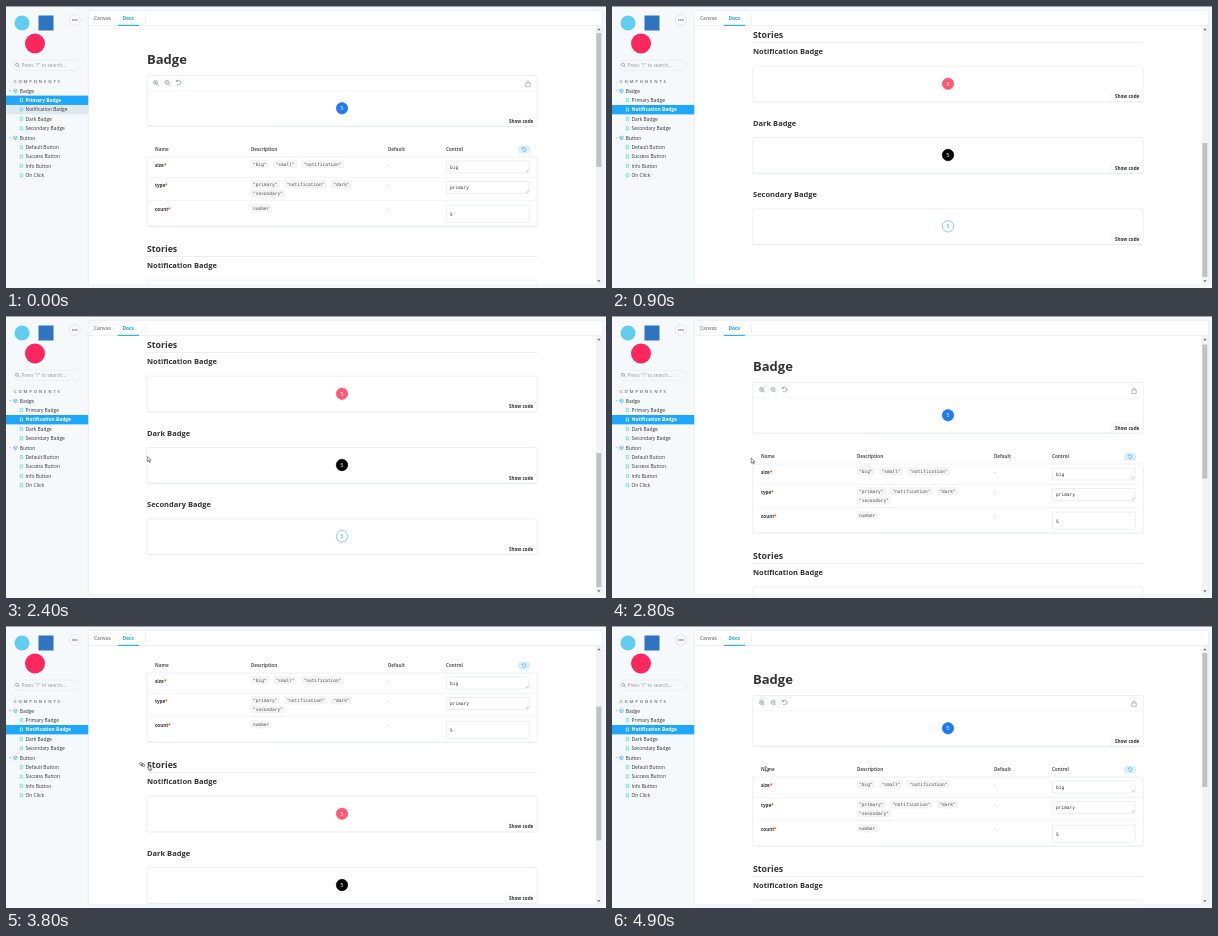
These frames come from a looping animation (600 px wide and 282 px high, 5 s). An HTML page:

```html
<!DOCTYPE html>
<html lang="en">
<head>
<meta charset="utf-8">
<title>Badge docs</title>
<style>
  html, body { margin: 0; width: 100%; height: 100%; overflow: hidden; background: #f6f9fc; }
  svg { display: block; width: 600px; height: 282px; }
  text { font-family: "Open Sans", "Noto Sans", sans-serif; fill: #333; white-space: pre; }
  .b { font-weight: 700; }
  .mono { font-family: "DejaVu Sans Mono", "Noto Sans Mono", monospace; }
  .line { fill: none; stroke: #73828c; stroke-width: .6; }
</style>
</head>
<body>
<svg id="stage" viewBox="0 0 600 282"></svg>
<script>
const stage = document.getElementById('stage');

function add(parent, tag, attrs = {}, label) {
  const el = document.createElementNS('http://www.w3.org/2000/svg', tag);
  for (const k in attrs) el.setAttribute(k, attrs[k]);
  if (label !== undefined) el.textContent = label;
  parent.appendChild(el);
  return el;
}
const group = (p, attrs) => add(p, 'g', attrs);
const rect = (p, x, y, width, height, fill, more) => add(p, 'rect', { x, y, width, height, fill, ...more });
const circle = (p, cx, cy, r, fill, more) => add(p, 'circle', { cx, cy, r, fill, ...more });
const path = (p, d, more) => add(p, 'path', { d, class: 'line', ...more });
const show = (el, on) => el.setAttribute('visibility', on ? 'visible' : 'hidden');
const move = (el, x, y) => el.setAttribute('transform', `translate(${x} ${y})`);

function label(p, x, y, size, str, cls = '', fill = '#333', more = {}) {
  return add(p, 'text', { x, y, 'font-size': size, class: cls, style: `fill:${fill}`, ...more }, str);
}

// Page frame
rect(stage, 0, 0, 600, 282, '#f6f9fc');
rect(stage, 82.3, 4.3, 514.4, 274.6, '#fff', { rx: 1.5, stroke: '#dfe5e9', 'stroke-width': .6 });
rect(stage, 0, 0, 600, .8, '#8d9092');

// Sidebar
const side = group(stage);
circle(side, 16, 17, 7.5, '#61cdf0');
rect(side, 32.5, 9.5, 15, 15, '#2f74c0');
circle(side, 29, 37.5, 10, '#fb275d');
circle(side, 68.8, 14, 5.5, '#f8fafc', { stroke: '#d5dce1', 'stroke-width': .6 });
for (const dx of [-2, 0, 2]) circle(side, 68.8 + dx, 14, .75, '#666');
rect(side, 7.5, 54, 67, 10.3, 'none', { rx: 5.1, stroke: '#e1e7eb', 'stroke-width': .6 });
circle(side, 11, 58.7, 1.5, 'none', { class: 'line' });
path(side, 'M12.1 59.8L13.5 61.2');
label(side, 15.5, 60.8, 4.8, 'Press "/" to search...', '', '#8f989e');
label(side, 8, 76.8, 4.2, 'COMPONENTS', 'b', '#7b868d', { 'letter-spacing': 1.8 });

const rowY = i => 84.9 + i * 9.39;
const rows = ['Badge', 'Primary Badge', 'Notification Badge', 'Dark Badge', 'Secondary Badge',
  'Button', 'Default Button', 'Success Button', 'Info Button', 'On Click'].map((name, i) => {
  const y = rowY(i), isGroup = i % 5 === 0;
  const bg = rect(side, 0, y - 4.7, 82.2, 9.4, 'none');
  if (isGroup) {
    add(side, 'path', { d: `M3.2 ${y - .7}h2.2l-1.1 1.4z`, fill: '#a5aeb4' });
    const icon = group(side, { transform: `translate(9.4 ${y})` });
    path(icon, 'M0 -1.9L1.7 -1V1L0 1.9L-1.7 1V-1ZM-1.7 -1L0 0L1.7 -1M0 0V1.9', { style: 'stroke:#1ea7fd;stroke-width:.5' });
    label(side, 13.8, y + 1.7, 4.85, name);
    return { bg };
  }
  const icon = path(side, `M14.2 ${y - 1.7}h2.4v3.4l-1.2 -1l-1.2 1z`);
  return { bg, icon, text: label(side, 19.5, y + 1.7, 4.88, name) };
});

function styleRow(i, selected, hover) {
  const { bg, icon, text } = rows[i];
  bg.setAttribute('fill', selected ? '#1ea7fd' : hover ? '#e0e9ef' : 'none');
  icon.style.stroke = selected ? '#fff' : '#37d5d3';
  text.style.fill = selected ? '#fff' : '#333';
  text.style.fontWeight = selected ? 700 : 400;
}
rows.forEach((row, i) => row.icon && styleRow(i, false, false));

// Tabs
label(stage, 88, 14.3, 4.75, 'Canvas', 'b', '#8e8e8e');
label(stage, 116.5, 14.3, 4.8, 'Docs', 'b', '#1ea7fd');
rect(stage, 82.6, 19.3, 513.8, .6, '#e3e7ea');
rect(stage, 112, 18.8, 21, 1.1, '#1ea7fd');
rect(stage, 139.5, 8.5, .6, 8, '#dcdfe1');

// Scrolling document
const clip = add(add(stage, 'defs'), 'clipPath', { id: 'view' });
rect(clip, 82.6, 20, 513.8, 258.6, '#000');
const view = group(stage, { 'clip-path': 'url(#view)' });
const doc = group(view);

function card(y, h) {
  rect(doc, 141, y + .8, 390, h, '#edf0f2', { rx: 1.5 });
  rect(doc, 140.8, y, 390.4, h, '#fff', { rx: 1.5, stroke: '#e2e4e6', 'stroke-width': .6 });
}

function preview(y, h, badgeY, fill, ink = '#fff', stroke = fill) {
  card(y, h);
  circle(doc, 336, badgeY, 5.7, fill, { stroke, 'stroke-width': .7 });
  label(doc, 336, badgeY + 2, 5.7, '5', '', ink, { 'text-anchor': 'middle' });
  path(doc, `M499 ${y + h}V${y + h - 9}H531`, { style: 'stroke:#eceeef;stroke-width:.5' });
  label(doc, 503, y + h - 3.4, 4.6, 'Show code', 'b');
}

label(doc, 141, 57.6, 13, 'Badge', 'b');
preview(69.5, 50.5, 102.3, '#2079ee');
rect(doc, 141, 84.7, 390, .5, '#e8eaeb');
for (const x of [149.6, 161]) {
  circle(doc, x, 76.4, 2, 'none', { class: 'line' });
  path(doc, `M${x + 1.4} 77.9l1.6 1.6M${x - 1} 76.4h2`);
}
path(doc, 'M149.6 75.4v2M170.6 75.2A2.3 2.3 0 1 1 171 78.2M170.4 73.9v1.7h1.7');
path(doc, 'M519.7 77h4.6v3.4h-4.6zM520.7 77v-.9a1.3 1.3 0 0 1 2.6 0v.9', { style: 'stroke:#999' });

for (const [x, name] of [[149, 'Name'], [245, 'Description'], [382, 'Default'], [440, 'Control']])
  label(doc, x, 145, 4.55, name, 'b', '#555');
rect(doc, 512, 140, 12, 7.2, '#dff1fd', { rx: 3.6, stroke: '#b9e1fb', 'stroke-width': .4 });
path(doc, 'M516.3 142.6A1.9 1.9 0 1 1 516.4 144.7M516.1 141.6v1.3h1.3', { style: 'stroke:#1ea7fd' });

card(151, 69);
for (const y of [171, 194.3]) rect(doc, 141, y, 390, .5, '#e9ebec');

function chips(y, ...names) {
  let x = 247;
  for (const name of names) {
    const w = name.length * 2.71;
    rect(doc, x - 2, y - 3.7, w + 4, 7.4, '#f5f5f5', { rx: 1, stroke: '#ececec', 'stroke-width': .4 });
    label(doc, x, y + 1.5, 4.5, name, 'mono', '#555');
    x += w + 9;
  }
}

function argRow(y, name, starX, boxY, boxH, value) {
  label(doc, 149, y + 1.8, 4.6, name, 'b');
  label(doc, starX, y + 1.8, 4.6, '*', 'b', '#ff4400');
  label(doc, 382, y + 1.8, 4.6, '-', '', '#777');
  rect(doc, 440.3, boxY, 82.9, boxH, '#fff', { rx: 1.2, stroke: '#dfe2e4', 'stroke-width': .6 });
  label(doc, 444, boxY + boxH / 2 + 1.8, 4.5, value, 'mono');
  if (boxH < 15) path(doc, `M519.8 ${boxY + boxH - .8}l2.6 -2.6M521.3 ${boxY + boxH - .8}l1.1 -1.1`, { style: 'stroke-width:.4' });
}
argRow(158.7, 'size', 157.9, 155, 12, 'big');
argRow(179, 'type', 159, 175.5, 12, 'primary');
argRow(203, 'count', 162, 199.2, 17, '5');
chips(158, '"big"', '"small"', '"notification"');
chips(178.3, '"primary"', '"notification"', '"dark"');
chips(187.5, '"secondary"');
chips(202.3, 'number');

label(doc, 141, 245.8, 8.75, 'Stories', 'b');
rect(doc, 141, 250, 390, .6, '#e3e5e6');
const stories = [
  ['Notification Badge', '#f95b74'],
  ['Dark Badge', '#000'],
  ['Secondary Badge', '#fff', '#3d9cc4', '#62b8dc']
];
stories.forEach(([name, ...paint], i) => {
  const y = i * 71.3;
  label(doc, 141, 262.2 + y, 7.5, name, 'b');
  preview(274.2 + y, 35.6, 291.7 + y, ...paint);
});

function anchor(y) {
  const g = group(doc, { transform: `translate(136.2 ${y})` });
  for (const x of [-1.1, 1.1])
    rect(g, x - 1.7, -1.2, 3.4, 2.4, 'none', { rx: 1.2, class: 'line', style: 'stroke:#333', transform: 'rotate(30)' });
  return g;
}
const storiesAnchor = anchor(242.6), darkAnchor = anchor(331);

// Scrollbar
rect(view, 589.8, 20, 6.2, 258.6, '#f3f3f3');
const thumb = rect(view, 590.3, 27, 5, 134, '#c0c1c2');
add(view, 'path', { d: 'M591.3 24.2h3.2l-1.6 -2z', fill: '#666' });
add(view, 'path', { d: 'M591.3 274.2h3.2l-1.6 2z', fill: '#666' });

// Link preview
const status = group(stage);
const statusBox = rect(status, -1, 273.9, 10, 9, '#3a3e42', { rx: 1, stroke: '#777b7f', 'stroke-width': .4 });
const statusText = label(status, 1.8, 279.8, 4.5, '', '', '#e4e6e8');
const baseUrl = 'https://monday-ui-components.netlify.app/?path=/docs/components-badge--';

function setStatus(end, width, opacity) {
  statusText.textContent = baseUrl + end;
  statusBox.setAttribute('width', width + 1);
  status.setAttribute('opacity', opacity);
}

// Pointers
const arrow = add(stage, 'path', {
  d: 'M0 0V5.2L1.25 4.1L2.1 6L3 5.6L2.15 3.8H3.8Z', fill: '#fff', stroke: '#222', 'stroke-width': .5
});
const beam = path(stage, 'M-1.2 -2.6Q0 -2.6 0 -2Q0 -2.6 1.2 -2.6M0 -2V2M-1.2 2.6Q0 2.6 0 2Q0 2.6 1.2 2.6', { style: 'stroke:#222' });

// Motion: [time, values...]
const scrollSteps = [[0, 0], [500, 0], [600, 214], [2400, 214], [2500, 188], [2600, 118], [2700, 44], [2800, 3],
  [3100, 3], [3200, 0], [3400, 0], [3500, 7], [3800, 104], [4000, 172], [4200, 210], [4300, 214],
  [4400, 214], [4500, 196], [4600, 134], [4700, 62], [4800, 14], [4900, 0]];
const pointerSteps = [[1800, 86, 122], [1900, 98, 127], [2100, 126, 137], [2300, 141, 141], [2400, 141.3, 140.6],
  [2800, 139.2, 142], [3400, 139.2, 142], [3800, 142.3, 139], [4400, 143, 140], [4900, 153.3, 140]];
const statusSteps = [[0, 0], [100, 0], [200, 1], [600, 1], [900, 0], [1700, 0], [1800, 1], [2000, 1], [2200, 0]];

function at(steps, t) {
  const i = steps.findIndex(s => s[0] > t);
  if (i < 0) return steps[steps.length - 1].slice(1);
  if (i === 0) return steps[0].slice(1);
  const a = steps[i - 1], b = steps[i], k = (t - a[0]) / (b[0] - a[0]);
  return a.slice(1).map((v, n) => v + (b[n + 1] - v) * k);
}

function draw(t) {
  const [scroll] = at(scrollSteps, t);
  move(doc, 0, -scroll);
  thumb.setAttribute('y', 27 + scroll / 214 * 110);

  const picked = t >= 100;
  styleRow(1, !picked, false);
  styleRow(2, picked, !picked);

  const [opacity] = at(statusSteps, t);
  if (t < 1800) setStatus('notification-b...', 199, opacity);
  else setStatus('dark-badge', 191, opacity);

  const [x, y] = at(pointerSteps, t);
  move(arrow, x, y);
  move(beam, x, y);
  show(beam, t >= 1800 && t < 1900);
  show(arrow, t >= 1900);
  show(darkAnchor, t >= 1800 && t < 2400);
  show(storiesAnchor, t >= 3700 && t < 3900);
}

const start = performance.now();
function tick() {
  const t = (performance.now() - start) % 5000;
  draw(Math.floor(t / 100) * 100);
  requestAnimationFrame(tick);
}
tick();
</script>
</body>
</html>
```
